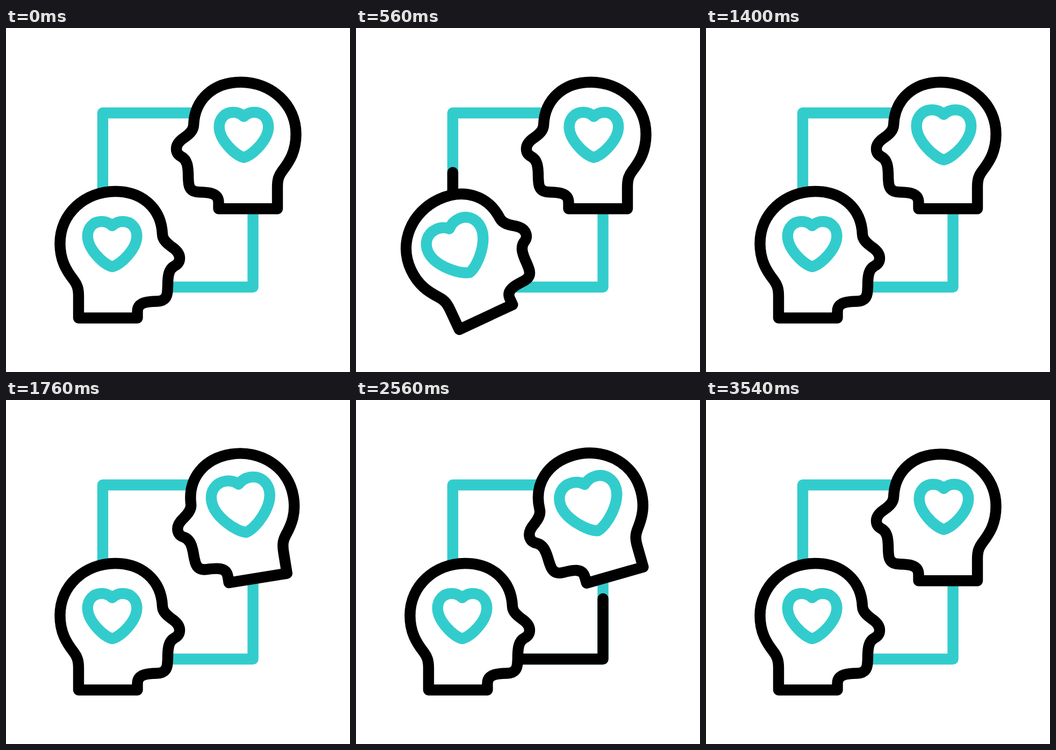
Write an HTML page that moves like this. It is 640 px wide and 640 px high and loops after 3600 ms.

```html
<!DOCTYPE html>
<html lang="en">
<head>
<meta charset="utf-8">
<title>Exchange of feelings</title>
<style>
  html, body { margin: 0; width: 100%; height: 100%; overflow: hidden; background: #fff; }
  svg { display: block; width: 100%; height: 100%; }
  path { fill: none; stroke-width: 20.4; stroke-linecap: round; stroke-linejoin: round; }
  .teal { stroke: #33cccc; }
  .black { stroke: #000; }
  .skin { fill: #fff; }
</style>
</head>
<body>
<svg viewBox="0 0 640 640">
  <defs>
    <path id="face" class="black skin" d="M135 539.5V499C135 484 132 477 126 469C112 451 100.5 432 100.5 401
      C100.5 345 147 304 203 304C253 304 289 335 291 384C291.5 394 299 400.5 308 407C317 413 323 419 323 428
      C323 436 319 440 313 443C303 449 301.5 460 301 474C301 479 301 483 300.500 488C300 502 294 508 281 508.500
      C262 509 244.500 510 244.500 528V539.500Z"/>
    <path id="heart" d="M0-34C-5.600-39.500-12-42-19.600-42C-35.500-42-45.800-30-45.800-15C-45.800 9-16.500 38 0 42
      C16.500 38 45.800 9 45.800-15C45.800-30 35.500-42 19.600-42C12-42 5.600-39.500 0-34Z"/>
  </defs>

  <path class="teal" d="M180 320V158H360"/>
  <path class="teal" d="M459.500 320V482H290"/>
  <path class="black trail" pathLength="1" d="M180 320V158H360"/>
  <path class="black trail" pathLength="1" d="M459.500 320V482H290"/>

  <g class="head">
    <use href="#face"/>
    <g class="love"><use href="#heart" class="teal"/></g>
  </g>
  <g transform="translate(640 -203.200) scale(-1 1)">
    <g class="head">
      <use href="#face"/>
      <g class="love"><use href="#heart" class="teal"/></g>
    </g>
  </g>
</svg>
<script>
const LOOP = 3600, TILT = 25, SWELL = 0.33, STROKE = 20.4, TRIM = 180;

// Times in ms. nod: rise start/end, fall start/end; beats: start, peak, end;
// trail: when its tip and its tail set off.
const people = [
  { dir: -1, nod: [0, 540, 720, 1260], beats: [[380, 720, 1050], [2880, 3220, 3540]], trail: [517, 929] },
  { dir: 1, nod: [1540, 2080, 2340, 2880], beats: [[1270, 1610, 1950], [2060, 2400, 2740]], trail: [2057, 2517] }
];

const all = sel => [...document.querySelectorAll(sel)];
const heads = all('.head'), loves = all('.love'), trails = all('.trail');

function ease(t, from, to) {
  const p = Math.min(1, Math.max(0, (t - from) / (to - from)));
  return p * p * (3 - 2 * p);
}

const pulse = (t, a, b, c, d) => ease(t, a, b) - ease(t, c, d);

function draw(t) {
  people.forEach(({ dir, nod, beats, trail }, i) => {
    const angle = dir * TILT * pulse(t, ...nod);
    // The second head lives in a mirrored group, so its turn is mirrored too.
    heads[i].setAttribute('transform', `rotate(${i ? angle * dir : angle} 212 421.5)`);
    if (i) heads[i].setAttribute('transform', `rotate(${angle} 212 421.5)`);

    const scale = beats.reduce((s, [a, b, c]) => s + SWELL * pulse(t, a, b, b, c), 1);
    loves[i].setAttribute('transform', `translate(197.6 402) scale(${scale})`);
    loves[i].firstChild.style.strokeWidth = STROKE / scale;
    loves[i].style.strokeWidth = STROKE / scale;

    const [tip, tail] = trail.map(s => ease(t, s, s + TRIM));
    const line = trails[i].style;
    line.visibility = tip > tail ? 'visible' : 'hidden';
    line.strokeDasharray = `${tip - tail} 2`;
    line.strokeDashoffset = -tail;
  });
}

// Hearts take their stroke width from the group so that it stays constant.
document.getElementById('heart').style.strokeWidth = 'inherit';

const start = performance.now();
function tick() {
  draw((performance.now() - start) % LOOP);
  requestAnimationFrame(tick);
}
draw(0);
requestAnimationFrame(tick);
</script>
</body>
</html>
```
